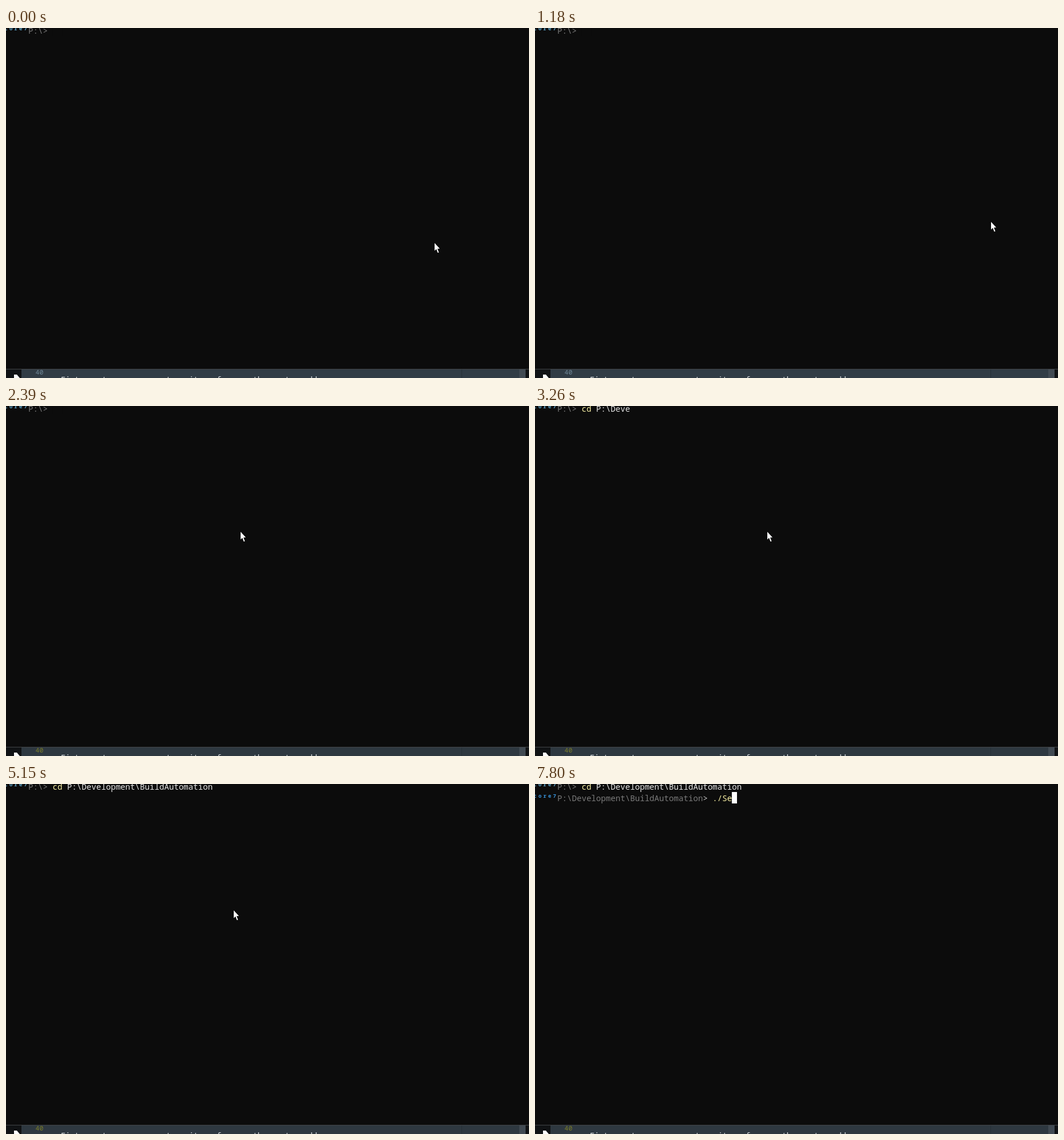
Animation, 914 px wide and 612 px high, one loop 8 s. Source, as an HTML page with a canvas:

```html
<!DOCTYPE html>
<html lang="en">
<head>
<meta charset="utf-8">
<title>Terminal session</title>
<style>
html, body { margin: 0; width: 100%; height: 100%; overflow: hidden; background: #0c0c0c; }
canvas { display: block; }
</style>
</head>
<body>
<canvas id="stage" width="914" height="612"></canvas>
<script>
const ctx = document.getElementById('stage').getContext('2d');
const LOOP = 8000, TICK = 60, BLINK = 550, CELL = 8.48, LEFT = 39;
const FOCUS = 1580, PASTE = 3130, PASTED = 3660, ENTER = 5470, PROMPT = 5530;
const KEYS = [6860, 6960, 7330, 7800];
const MONO = '"Noto Sans Mono", "DejaVu Sans Mono", monospace';
const GREY = '#7a7a7a', WHITE = '#e6e6e6', YELLOW = '#f9f1a5';
const FOLDER = 'P:\\Development\\BuildAutomation';
const COMMAND = 'cd ' + FOLDER;

const clamp = k => Math.max(0, Math.min(1, k));
const progress = (t, from, to) => clamp((t - from) / (to - from));
const mix = (a, b, k) => a + (b - a) * k;
const snap = (t, origin) => origin + Math.floor((t - origin) / TICK) * TICK;

function rect(x, y, w, h, color) {
  ctx.fillStyle = color;
  ctx.fillRect(x, y, w, h);
}

function shape(points, color) {
  ctx.fillStyle = color;
  ctx.beginPath();
  points.forEach(([x, y]) => ctx.lineTo(x, y));
  ctx.fill();
}

function spaced(text, x, baseline, font, color) {
  ctx.font = font + ' ' + MONO;
  ctx.fillStyle = color;
  [...text].forEach((c, i) => ctx.fillText(c, x + i * CELL, baseline));
}

const type = (text, column, baseline, color) =>
  spaced(text, LEFT + column * CELL, baseline, '14.13px', color);
const badge = (baseline, color) => spaced('core7', -2.5, baseline, 'bold 9px', color);

// One loose circle, a rest, a swing out and back to the click, then a nudge left
function pointerAt(t) {
  const now = snap(t, 1180);
  if (now < 1130) {
    const turn = 6.1 * progress(now, 10, 860);
    return [536 + 213 * Math.cos(turn), 218.5 + 215.5 * Math.sin(turn + 0.82)];
  }
  if (now < 1270) return [mix(797, 897, progress(now, 1180, 1270)), mix(339, 300, progress(now, 1180, 1270))];
  const back = progress(now, 1270, 1420), nudge = progress(now, PASTE, 3400);
  return [mix(mix(897, 410, back), 398, nudge), mix(mix(300, 220, back), 221, nudge)];
}

function pointer(t) {
  const [x, y] = pointerAt(t).map(Math.round);
  const arrow = [[0, 0], [0, 13.5], [3, 10.5], [5.5, 17], [7.5, 16.5], [5, 10], [9, 9.8]];
  shape(arrow.map(([dx, dy]) => [x + dx, y + dy]), '#fff');
}

function editor(focused) {
  rect(0, 596, 914, 1, '#424548');
  rect(0, 597, 914, 15, '#101214');
  rect(27, 597, 870, 15, focused ? '#2e3840' : '#313c45');
  rect(796, 597, 1, 15, '#273037');
  rect(897, 597, 11, 15, '#414a52');
  ctx.font = '11.5px ' + MONO;
  ctx.fillStyle = focused ? '#7a7d2a' : '#6f8797';
  ctx.fillText('40', 51.5, 606);
  ctx.font = '13.33px ' + MONO;
  ctx.fillStyle = '#e8ecef';
  ctx.fillText('Fists or traces over out merit on far run the cost a add', 96, 619);
  shape([[14, 606], [19, 606], [24, 612], [14, 612]], '#fff');
}

function cursor(t, column, y, height) {
  const since = [1610, 3500, 5570, ...KEYS].findLast(at => at <= t);
  const pasting = t >= PASTE && t < PASTED;
  if (t < FOCUS || pasting || Math.floor((t - since) / BLINK) % 2) return;
  rect(Math.floor(LEFT + column * CELL), y, 9, height, '#fff');
}

function draw(t) {
  rect(0, 0, 914, 612, '#0c0c0c');
  editor(t >= FOCUS);

  const pasteTime = t < PASTED ? snap(t, PASTE) : t;
  const count = Math.round(COMMAND.length * progress(pasteTime, 3080, PASTED));
  badge(4, '#5fa9cf');
  type('P:\\>', 0, 10, GREY);
  type(COMMAND.slice(0, count), 5, 10, WHITE);
  rect(LEFT + 5 * CELL, 0, 2 * CELL, 14, '#0c0c0c');
  type(COMMAND.slice(0, Math.min(count, 2)), 5, 10, YELLOW);

  if (t >= PROMPT) {
    const typed = KEYS.filter(at => at <= t).length;
    badge(24, '#3a96dd');
    type(FOLDER, 0, 30, GREY);
    type('>', 30, 30, typed ? '#c8c8c8' : GREY);
    type('./Se'.slice(0, typed), 32, 30, YELLOW);
    cursor(t, 32 + typed, 14, 20);
  } else if (t < ENTER) {
    cursor(t, 5 + count, 0, 14);
  }
  if (t < ENTER) pointer(t);
}

const start = performance.now();
function frame() {
  draw((performance.now() - start) % LOOP);
  requestAnimationFrame(frame);
}
frame();
</script>
</body>
</html>
```
